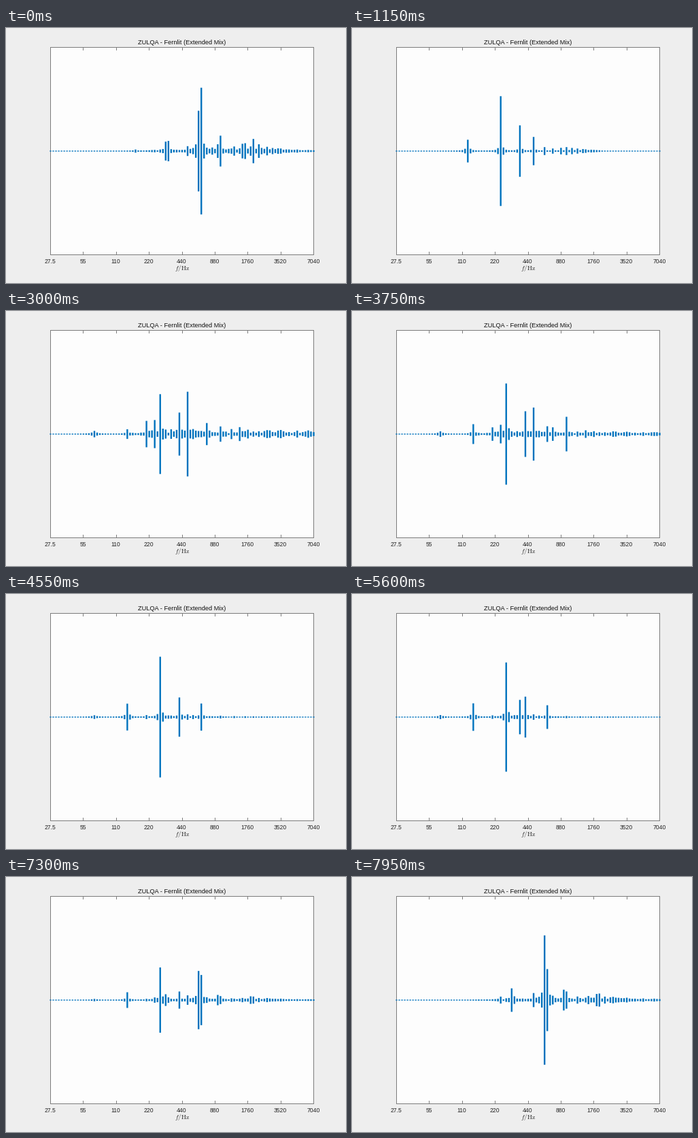
A matplotlib script for the animation above (8000 ms loop, 500 by 375 pixels).

```python
import numpy as np
import matplotlib.pyplot as plt
from matplotlib.animation import FuncAnimation
from matplotlib.collections import LineCollection
from matplotlib.patches import Rectangle

W, H, DPI = 500, 375, 100
STEP, FRAMES = 50, 160
PX = 72 / DPI
LEFT, RIGHT, TOP, BOTTOM = 65, 452, 28, 333
MID = (TOP + BOTTOM + 1) / 2
BLUE, INK, EDGE = "#0072bd", "#262626", "#7c7c7c"
FLOOR = 0.65        # half height of a silent bar, in pixels
BARS = 97           # eight octaves of semitones
BEAT = 262.5

plt.rcParams["font.family"] = "Liberation Sans"
plt.rcParams["mathtext.fontset"] = "cm"

bar = np.arange(BARS)
rng = np.random.default_rng(8)
grain = rng.uniform(0, 1, BARS)
phase = rng.uniform(0, 2 * np.pi, BARS)


def peak(pos, amp):
    """A spectral line that leaks into its neighbours, wider at low pitch."""
    width = 0.2 * max(1, 2 ** ((40 - pos) / 12))
    g = 1 / (1 + ((bar - pos) / width) ** 2)
    return amp * g / g.max()


def tone(pitch, *amps):
    """Harmonic series on a pitch; partials past the given ones die away."""
    h = np.zeros(BARS)
    for n in range(1, 17):
        pos = pitch + 12.06 * np.log2(n)
        if pos < BARS - 1:
            amp = amps[n - 1] if n <= len(amps) else amps[-1] * 0.75 ** (n - len(amps))
            h += peak(pos, amp)
    return h


def bed(size):
    """Faint noise above the bass."""
    return size * grain / (1 + np.exp((32 - bar) / 2))


bright = tone(42.5, 12, 88, 19, 4, 9, 16, 8, 4) + tone(31, 1.5, 2, 5) + bed(1)
low = tone(26, 16, 80, 37, 20, 5, 3, 4, 5)
wide = tone(42.8, 4, 109, 24, 5, 10, 18, 8, 4) + bed(3)
for i in range(3):
    wide += tone(31 + i, 26 + 3.5 * i, 19 + 4.5 * i, 5, 1)
dense = tone(16, 4, 6, 17, 53, 4, 29, 4, 3) + tone(38, 15, 55, 12, 8, 3, 5, 3) + bed(5)
calm = tone(16, 2, 19, 2, 88, 1, 28, 3, 2, 1) + tone(43, 1, 19, 1)
mellow = 0.97 * calm * np.exp(-np.maximum(bar - 40, 0) / 30)
close = tone(42.33, 15, 94, 14, 2, 4, 8, 3) + tone(38, 3, 8, 2) + bed(1.5)

SCORE = [(0, bright), (1150, low), (2050, wide), (3000, dense),
         (4550, calm), (6650, mellow), (7950, close)]
tune = rng.choice([40, 45, 47, 50, 54, 55, 62], 32)


def heights(t):
    i = max(n for n, (start, _) in enumerate(SCORE[:-1]) if start <= t)
    (t0, a), (t1, b) = SCORE[i], SCORE[i + 1]
    u = (t - t0) / (t1 - t0)
    v = np.clip((u - 0.2) / 0.6, 0, 1)
    v = v * v * (3 - 2 * v)

    # shimmer and plucked notes fade out where a chord stands
    free = np.sin(np.pi * u) ** 2
    shimmer = 1 + 0.18 * free * np.sin(t / 95 + phase)
    n, rest = divmod(t, BEAT)
    pluck = peak(tune[int(n)], 32 * free * np.sin(np.pi * rest / BEAT) ** 2)
    return FLOOR + (a * (1 - v) + b * v) * shimmer + pluck


fig = plt.figure(figsize=(W / DPI, H / DPI), dpi=DPI, facecolor="#eeeeee")
ax = fig.add_axes([0, 0, 1, 1])
ax.set_xlim(0, W)
ax.set_ylim(H, 0)
ax.axis("off")


def label(x, y, text, size, color=INK):
    ax.text(x, y, text, size=size * PX, color=color, ha="center", va="baseline")


ax.add_patch(Rectangle((LEFT, TOP), RIGHT - LEFT, BOTTOM - TOP, fc="#fdfdfd",
                       ec=EDGE, lw=PX, zorder=1))
for i, x in enumerate(np.linspace(LEFT, RIGHT, 9)):
    for y, dy in ((TOP, 4), (BOTTOM, -4)):
        ax.plot([x, x], [y, y + dy], color=EDGE, lw=PX, zorder=2)
    label(x, 346.3, f"{27.5 * 2 ** i:g}", 8.6)
label(259, 23.5, "ZULQA - Fernlit (Extended Mix)", 9.3, "#111111")
label(259, 355.8, r"$f/\mathrm{Hz}$", 9.4)

xs = np.linspace(LEFT, RIGHT, BARS) + 0.5
bars = LineCollection([], colors=BLUE, linewidths=2.4 * PX, capstyle="butt", zorder=3)
bars.set_snap(False)
ax.add_collection(bars, autolim=False)


def draw(frame):
    h = heights(frame * STEP)
    bars.set_segments([[(x, MID - y), (x, MID + y)] for x, y in zip(xs, h)])
    return (bars,)


anim = FuncAnimation(fig, draw, frames=FRAMES, interval=STEP, repeat=True, repeat_delay=0)
plt.show()
```
